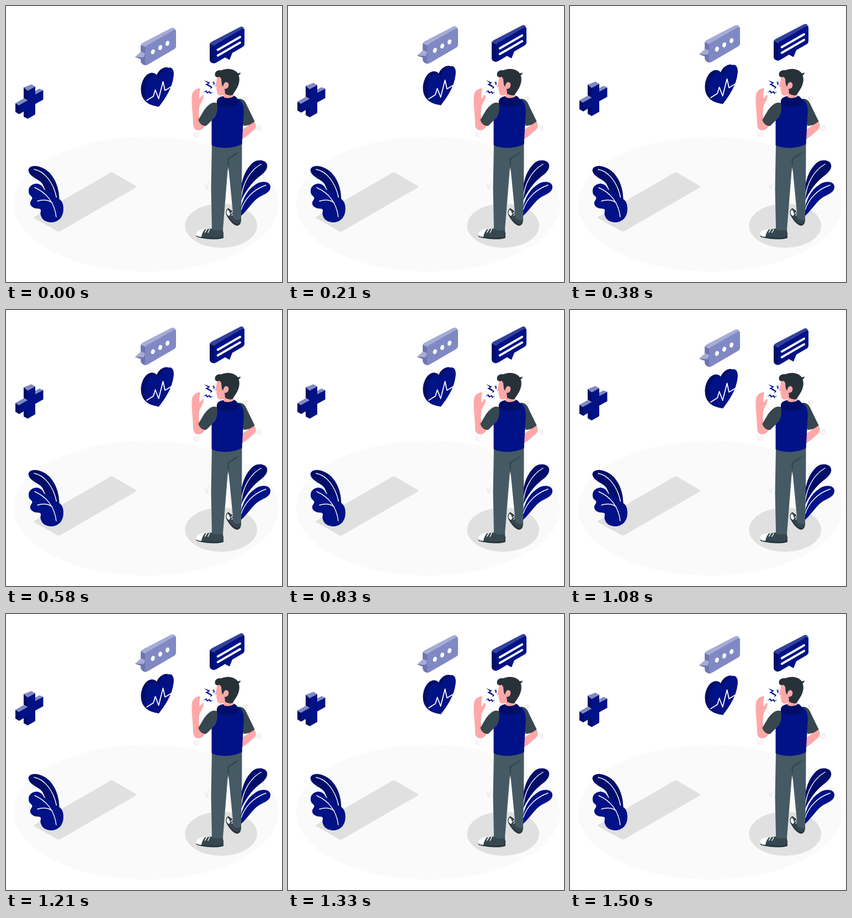
These frames come from a looping animation (500 px wide and 500 px high, 1.54 s). An HTML page:

```html
<!DOCTYPE html>
<html lang="en">
<head>
<meta charset="utf-8">
<title>Coughing man</title>
<style>
  html, body { margin: 0; height: 100%; overflow: hidden; background: #fff; }
  svg { display: block; width: 100vw; height: 100vh; }
  .navy { fill: #001285; }
  .deep { fill: #000e6a; }
  .mid { fill: #33419d; }
  .pale { fill: #8089c3; }
  .paler { fill: #a6acd5; }
  .dusk { fill: #6e76b2; }
  .grey { fill: #e0e0e0; }
  .skin { fill: #ffa8a7; }
  .hair { fill: #263238; }
  .sleeve { fill: #37474f; }
  .trousers { fill: #455a64; }
  .white { fill: #fff; }
  .line { fill: none; stroke: #fff; stroke-width: 1.4; stroke-linecap: round; stroke-linejoin: round; }
  .shake { fill: none; stroke: #e0e0e0; stroke-width: 1.2; stroke-linecap: round; }
</style>
</head>
<body>
<svg viewBox="0 0 500 500">
  <!-- floor and shadows -->
  <ellipse cx="254" cy="359" rx="239.5" ry="122" fill="#fafafa"/>
  <path class="grey" d="M51 382 L189 302 Q191.500 300.500 194 302 L235 326 Q237.500 327.500 235 329 L98 408 Q95.500 409.500 93 408 L51 384.500 Q49 383 51 382Z"/>
  <ellipse class="grey" cx="389.700" cy="398" rx="65.300" ry="40"/>

  <!-- left plant -->
  <path class="deep" d="M41 300 C39 293 46 289 55 290 C79 293 96 318 96.500 350 L76 341 C70 334 69 326 65 321 C59 313 45 311 41 300Z"/>
  <path class="line" d="M51 296 C69 299 86 319 91.500 347"/>
  <path class="navy" d="M41 335 C41 326 50 321 57 322 C64 323 67 328 69 332 C71 335 75 333 80 336 C87 340 87 347 91 347 C101 350 104 358 104 367 C104 383 95 391 83 392 C72 392 65 387 63 379 C61 372 67 368 58 367 C49 367 43 362 44 356 C45 351 50 349 46 345 C42 342 41 339 41 335Z"/>
  <path class="line" d="M52 329 C73 338 88 356 91 382 M57 353.500 C67 350 78 351 84 357"/>

  <!-- right plant -->
  <path class="deep" d="M425 348 C424 321 432 297 447 284 C454 278 467 278 472 285 C476 292 470 300 464 305 C450 315 438 328 426 352Z"/>
  <path class="line" d="M462 286.500 C442 298 429 320 426 348"/>
  <path class="navy" d="M424 382 C425 352 437 331 457 320.500 C468 316 480 319 479 329 C478 338 468 341 459 346 C446 354 440 368 424 382Z"/>
  <path class="line" d="M471 324.500 C449 332 433 348 426 369"/>

  <!-- far arm -->
  <path class="skin" d="M449 208 C454 214 454 221 448 225.500 C441 231 435 238 427 241.500 V224 C434 221 438 217 441 213Z"/>
  <path class="sleeve" d="M418 169 C426 166 432 170 435 177 L450.500 209 C445 214 438 217 430 217 L426 200Z"/>

  <!-- shoes -->
  <path class="hair" d="M403 366 C398 369 397 374 400 380 C405 389 412 397 418 398 C424 398 426 393 426 385 L412 382Z"/>
  <path class="sleeve" d="M404 367 L411 372 L413 385 L426 386 C425 391 424 394 419 395 C412 393 406 386 402 379Z"/>
  <path class="white" d="M401.500 369 C398.500 372 399 376 402 379.500 C404 380.500 405.500 379.500 406 377 L404 371Z"/>
  <path class="line" style="stroke-width:1.200" d="M407.500 376 L410.500 373 M409 379.500 L411 377"/>
  <path class="hair" d="M346 413 L394 410 V420 C385 424.500 360 422.500 346 418.500 Q343.500 417 346 413Z"/>
  <path class="sleeve" d="M373 403 L393 404 L394 418 C378 421.500 362 419.500 346 416.500 C343 412 352 405 360 405Z"/>
  <path class="white" d="M360 404.500 C352 404 344.500 408 344.500 413 Q344.500 416.500 348 417.500 L354 418.500 C355 411 358 408 360 404.500Z"/>
  <path class="line" d="M364 404.500 L360.500 410 M369 404.500 L366 410.500"/>

  <!-- legs -->
  <path class="trousers" d="M373 249 L371.500 330 L373 404 C379 408 388 407 393 405 L402.500 286 L412 384 C416 388 422 388 426 386 C427 340 427.500 290 427.500 246Z"/>
  <path class="sleeve" d="M401 276 L423 263 C418 270 411 274 404.500 277 L403 300 L402 290Z"/>

  <!-- torso -->
  <path class="navy" d="M382 175 C392 169 410 166 420 168.500 C429 172 431.500 182 430.500 196 L427.500 250 C412 259 386 259 372.500 252 V200Z"/>
  <path class="deep" d="M386 166 C381 169 380 176 385 179 C394 184 411 185 420 179 C422 173 420 166 414 163 C405 161 393 162 386 166Z"/>

  <!-- head -->
  <path class="skin" d="M383 126 L381 137 L379 145.500 Q379 147 382 147 L381 151 L382.500 154 C382 160 385 163 391 162 L395 160.500 L394 165 C399 168 407 167 412 164 V128Z"/>
  <path class="hair" d="M379 127 C377 120 382 115.500 390 116.500 C399 112 414 113 420 122 Q423 122 424.500 120.500 Q426 123 421.500 125.500 C426 138 418 151 410.500 161 Q405 163.500 397 159 L396 149 L391 143 L390 132 L387 128 C384 130 381 129 379 127Z"/>
  <ellipse class="skin" cx="398.500" cy="144" rx="4.800" ry="6.200" transform="rotate(15 398.500 144)"/>

  <!-- near arm -->
  <path class="skin" d="M352 150 C348 147 338 153 337 161 C335 176 339 196 339 214 C339 226 350 228 356 222 L363 215 L349 205 L350 184 C351 177 358 170 358 162 Q356 160 354 164 L350.500 168 C349 161 351 155 352 150Z"/>
  <path class="sleeve" d="M382 176 C373 172 364 181 358 190 L348.500 206 C350 213 356 218 363 217 L378 202 C383 194 384 184 382 176Z"/>
  <path d="M350 197 L346 208 L349 206Z" fill="#f28f8f"/>

  <!-- cough and shake marks -->
  <path class="navy" d="M359 134.500 L370 139 L366 141.500 L374 147 L370 151 L371 147.500 L361 142 L366 140Z M357 157 L363 152.500 L365 156 L369 154 L371 157 L375.500 155 L370 159.500 L368 156.500 L364 158.500 L362 155Z M378 134.500 L376 138 L378.500 139 L377 142 L379 144 L375 142 L376.500 140 L374 139Z"/>
  <path class="shake" d="M431 165.500 Q437 164 439 169 M432 168.500 Q435 168 436 172 M459 216 Q464 220 459 226 M456 217 Q460 220 456 225 M453 219 Q455 221 453 224 M340 230 Q345 233 350 230.500 M340 234 Q344 237 349 235 M362 324 Q360 327 363 330.500 M367 322 Q363 327 366 332"/>

  <g id="icons">
    <!-- pale bubble -->
    <path class="dusk" d="M244 70 L254 74 V107.500 C248 107 244 104 244 99Z"/>
    <path class="paler" d="M244 70.500 Q245 68 248 66.500 L299 40 Q304 38 307 42 L254 75Z"/>
    <path class="pale" d="M252 77 Q252 73 256 71 L304 43.500 Q308 41.500 308 46 V73 Q308 76 305 78 L257 106 Q252 109 252 103Z"/>
    <path class="paler" d="M233.500 92.500 L245 82.500 L252 86 L249 95Z"/>
    <path class="dusk" d="M233.500 92.500 L250 93 V98.500Z"/>
    <g class="white">
      <ellipse cx="266.200" cy="83" rx="3.300" ry="4.600" transform="rotate(20 266.200 83)"/>
      <ellipse cx="279.500" cy="75.300" rx="3.300" ry="4.600" transform="rotate(20 279.500 75.300)"/>
      <ellipse cx="292.600" cy="67.700" rx="3.300" ry="4.600" transform="rotate(20 292.600 67.700)"/>
    </g>

    <!-- navy bubble -->
    <path class="deep" d="M369 68 L378 72 V104 C372 104 369 101 369 97Z"/>
    <path class="mid" d="M369 68.500 Q370 66 373 64.500 L424 38 Q428.500 36 431 40 L378 73Z"/>
    <path class="navy" d="M377 75 Q377 71 381 69 L428 41.500 Q432 39.500 432 44 V69 Q432 72 429 74 L410 85 L405 97.500 L397 93 L381 102.500 Q377 105 377 100Z"/>
    <path class="deep" d="M397 93 L399 91.500 L405 97.500Z"/>
    <path class="line" style="stroke-width:4" d="M383.700 79.500 L424 56.200 M383.700 89.700 L424 66.400"/>

    <!-- heart -->
    <path class="deep" d="M277 182 C259 181 245 171 244.500 153 C244 138 252 122 264 121 Q270 121 273 125 C276 117 284 110.500 292 111 L302 116 L284 168Z"/>
    <path class="navy" d="M277 182.500 C262 180 252 172 252 157 C251.500 142 259 128 267 125.500 Q273 124.500 276 132 C280 121 288 112.500 296 111.500 C302.500 111.500 305 119 303.500 128 C301 149 289 167 277 182.500Z"/>
    <path class="line" style="stroke-width:1.800" d="M255 171 L267 163.500 L270.500 152 L276.500 168 L284.500 137 L288 153 L299 146.500"/>

    <!-- cross -->
    <path class="deep" d="M32 147 L39 152 V171 L32 167Z M17 176 L24 180 V196 L17 192Z M32 190 L40 186 V204.500 L32 200.500Z"/>
    <path class="pale" d="M32 147.500 L46 142 L53 146 L39 153.500Z M17 176 L32 167.500 L39 171 L24 180Z M53 154 L60.500 149.800 L67.500 152.500 L53 160Z"/>
    <path class="navy" d="M39 153.500 L53 146 V160 L67.500 152.500 V169.500 L53 177.500 V196.500 L39 204.500 V187 L24 196 V179.500 L39 171Z"/>
  </g>
</svg>
<script>
  const LOOP = 1540, HALF = LOOP / 2, PEAK = 705, LIFT = 10;
  const icons = document.getElementById('icons');

  // Linear rise and fall; the highest point is at PEAK.
  function draw() {
    const t = performance.now() % LOOP;
    const away = Math.abs(t - PEAK);
    const drop = Math.min(away, LOOP - away) / HALF;
    const rest = PEAK / HALF;
    icons.setAttribute('transform', `translate(0 ${(LIFT * (drop - rest)).toFixed(3)})`);
    requestAnimationFrame(draw);
  }
  draw();
</script>
</body>
</html>
```
